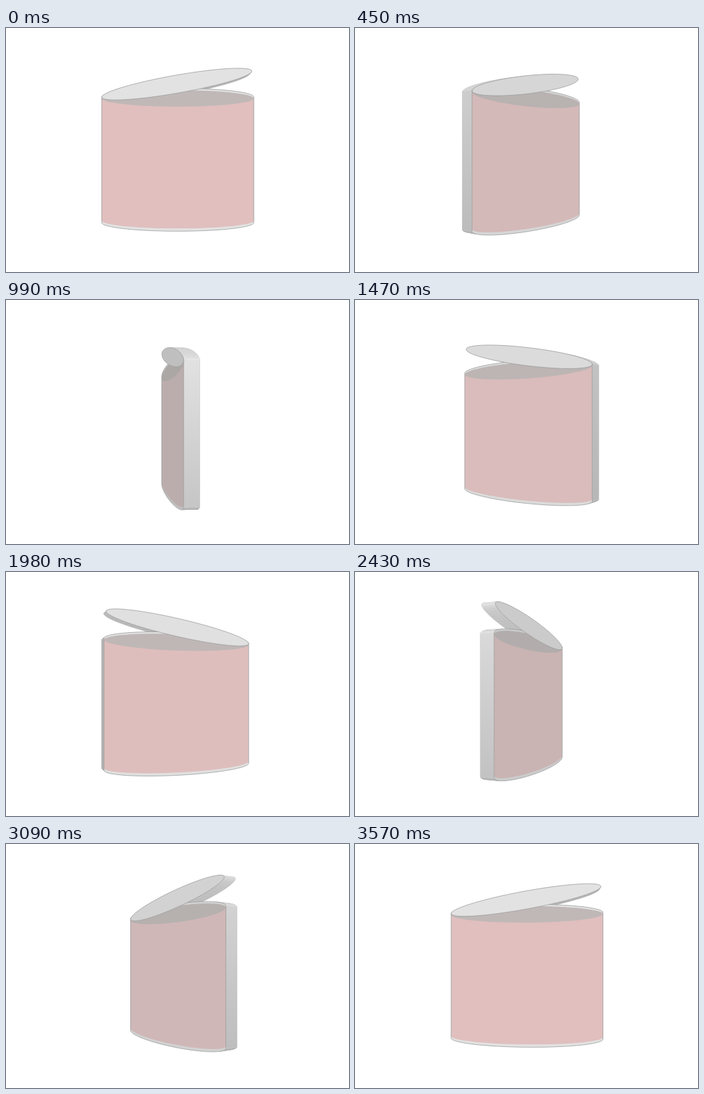
An HTML page with a canvas that plays this animation: 500x357 px, repeating every 3.6 s.

```html
<!DOCTYPE html>
<html lang="en">
<head>
<meta charset="utf-8">
<title>Turning open tin</title>
<style>
html, body { margin: 0; width: 100%; height: 100%; overflow: hidden; background: #fff; }
canvas { display: block; }
</style>
</head>
<body>
<canvas id="stage" width="500" height="357"></canvas>
<script>
const ctx = document.getElementById('stage').getContext('2d');
const LOOP = 3600, STEP = 30, TAU = 2 * Math.PI;
const CX = 250.4, CY = 178.5, CAMERA = 700, HALF = 10;
const FRONT_SCALE = CAMERA / (CAMERA - HALF);

// Points of an elliptical arc, given in stage pixels as seen head-on.
function arc(cx, cy, rx, ry, from, to, tilt = 0, count = 60) {
  const c = Math.cos(tilt), s = Math.sin(tilt);
  return Array.from({ length: count + 1 }, (_, i) => {
    const a = from + (to - from) * i / count;
    const x = rx * Math.cos(a), y = ry * Math.sin(a);
    return toModel(cx + x * c - y * s, cy + x * s + y * c);
  });
}
function toModel(x, y) {
  return [(x - CX) / FRONT_SCALE, (y - CY) / FRONT_SCALE];
}
function drum(rx, top, topRy, bottom, bottomRy) {
  return [
    ...arc(CX, bottom, rx, bottomRy, 0, Math.PI),
    ...arc(CX, top, rx, topRy, Math.PI, TAU)
  ];
}

const body = drum(110.8, 100.8, 12.6, 284.8, 12.5);
const label = drum(110.8, 103, 11, 281.8, 11.5);
const opening = arc(CX, 103, 110.6, 12, 0, TAU);
const lid = arc(249, 82.1, 111, 13.1, 0, TAU, -Math.PI / 18);

let sin = 0, cos = 1;

function turn(x, z) {
  return [x * cos + z * sin, z * cos - x * sin];
}
function project([x, y], z) {
  const [tx, tz] = turn(x, z);
  const k = CAMERA / (CAMERA - tz);
  return [CX + tx * k, CY + y * k];
}
function trace(points) {
  ctx.beginPath();
  points.forEach(p => ctx.lineTo(p[0], p[1]));
  ctx.closePath();
}
function face(shape, z, fill, line) {
  trace(shape.map(p => project(p, z)));
  if (fill) {
    ctx.fillStyle = fill;
    ctx.fill();
  }
  if (line) {
    ctx.strokeStyle = line;
    ctx.lineWidth = 0.8;
    ctx.stroke();
  }
}
function shade(base, gain, light) {
  return `rgb(${base.map((b, i) => Math.round(b + gain[i] * light)).join()})`;
}

// Side walls that face the camera, with their depth and brightness.
function walls(shape) {
  const found = [];
  shape.forEach((p, i) => {
    const q = shape[(i + 1) % shape.length];
    const dx = q[0] - p[0], dy = q[1] - p[1];
    const len = Math.hypot(dx, dy);
    if (len < 1e-6) return;
    const [nx, nz] = turn(dy / len, 0);
    const ny = -dx / len;
    const my = (p[1] + q[1]) / 2;
    const [mx, mz] = turn((p[0] + q[0]) / 2, 0);
    const vz = CAMERA - mz;
    const light = (-nx * mx - ny * my + nz * vz) / Math.hypot(mx, my, vz);
    if (light <= 0) return;
    found.push({ p, q, light, up: Math.max(0, -ny), depth: mz });
  });
  return found;
}
// The lamp hangs high, so walls fade towards the floor.
function drawWall({ p, q, light, up }) {
  const tone = y => {
    const v = Math.min(230, 172 + light * (42 - 0.15 * y) + 34 * up);
    return `rgb(${v},${v},${v})`;
  };
  const fill = ctx.createLinearGradient(...project(p, 0), ...project(q, 0));
  fill.addColorStop(0, tone(p[1]));
  fill.addColorStop(1, tone(q[1]));
  trace([project(p, HALF), project(q, HALF), project(q, -HALF), project(p, -HALF)]);
  ctx.fillStyle = ctx.strokeStyle = fill;
  ctx.lineWidth = 0.5;
  ctx.fill();
  ctx.stroke();
}

function draw(time) {
  const angle = Math.floor((time % LOOP) / STEP) * STEP / LOOP * TAU;
  sin = Math.sin(angle);
  cos = Math.cos(angle);
  ctx.fillStyle = '#fff';
  ctx.fillRect(0, 0, 500, 357);

  const near = cos >= 0 ? HALF : -HALF;
  const light = Math.abs(cos);

  face(body, -near, null, '#b0b0b0');
  face(lid, -near, null, '#b0b0b0');
  [...walls(body), ...walls(lid)].sort((a, b) => a.depth - b.depth).forEach(drawWall);

  // A flat side shows only while it faces the camera in perspective.
  if (light * CAMERA <= HALF) return;
  const metal = shade([184, 184, 184], [42, 42, 42], light);
  const line = '#9c9e9e';
  face(body, near, metal);
  face(label, near, shade([181, 170, 170], [43, 21, 20], light));
  face(opening, near, shade([166, 164, 162], [26, 20, 21], light));
  face(body, near, null, line);
  face(lid, near, metal, line);
}

function frame(now) {
  draw(now);
  requestAnimationFrame(frame);
}
draw(0);
requestAnimationFrame(frame);
</script>
</body>
</html>
```
